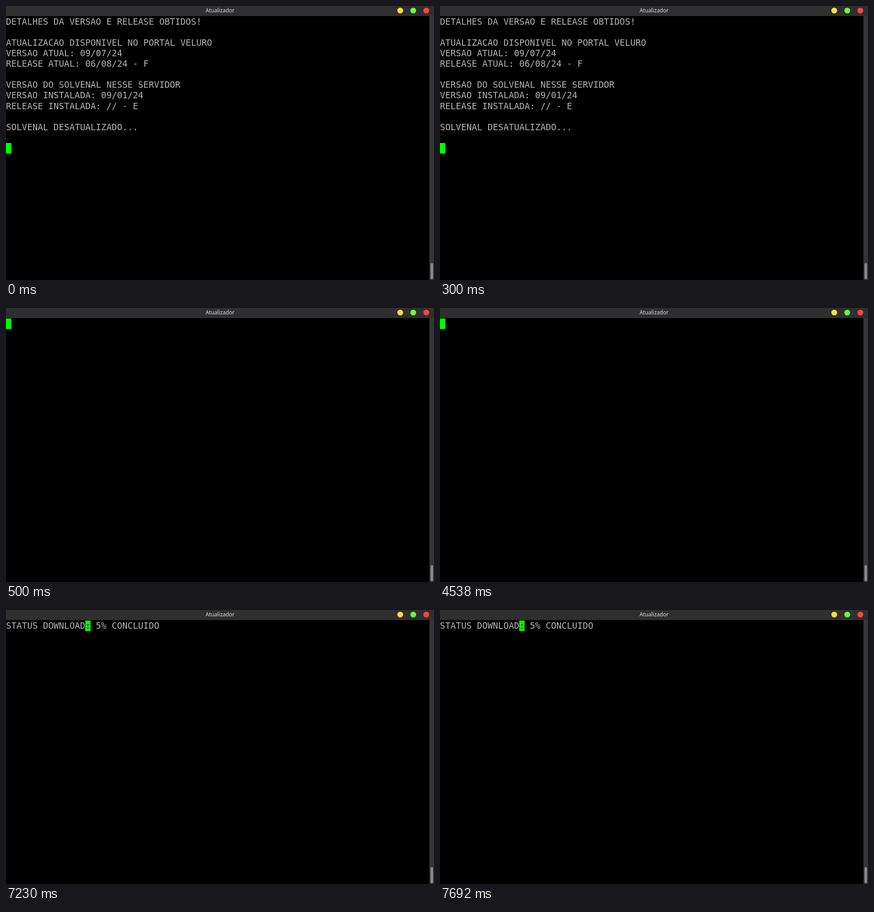
An HTML page with a canvas that plays this animation: 934x600 px, repeating every 8 s.

```html
<!DOCTYPE html>
<html lang="pt-BR">
<head>
<meta charset="utf-8">
<title>Atualizador</title>
<style>
html, body { margin: 0; width: 100%; height: 100%; overflow: hidden; background: #000; }
canvas { display: block; }
</style>
</head>
<body>
<canvas id="stage" width="934" height="600"></canvas>
<script>
const ctx = document.getElementById('stage').getContext('2d');
const LOOP = 8000;
const CELL_W = 11.54, CELL_H = 23.08, TOP = 23;

const screens = [
  {
    from: 0,
    cursor: [0, 12],
    lines: [
      'DETALHES DA VERSAO E RELEASE OBTIDOS!',
      '',
      'ATUALIZACAO DISPONIVEL NO PORTAL VELURO',
      'VERSAO ATUAL: 09/07/24',
      'RELEASE ATUAL: 06/08/24 - F',
      '',
      'VERSAO DO SOLVENAL NESSE SERVIDOR',
      'VERSAO INSTALADA: 09/01/24',
      'RELEASE INSTALADA: // - E',
      '',
      'SOLVENAL DESATUALIZADO...'
    ]
  },
  { from: 500, cursor: [0, 0], lines: [] },
  { from: 7230, cursor: [15, 0], lines: ['STATUS DOWNLOAD: 5% CONCLUIDO'] }
];

function rect(x, y, w, h, color) {
  ctx.fillStyle = color;
  ctx.fillRect(x, y, w, h);
}

function dot(x, color) {
  ctx.fillStyle = color;
  ctx.beginPath();
  ctx.arc(x, 10, 6.3, 0, Math.PI * 2);
  ctx.fill();
}

function drawWindow() {
  rect(0, 0, 934, 600, '#000');
  rect(0, 0, 934, 22, '#2f2f2f');
  ctx.font = '500 11.8px "Noto Sans", "Open Sans", sans-serif';
  ctx.textAlign = 'center';
  ctx.fillStyle = '#dcdcdc';
  ctx.fillText('Atualizador', 467, 14);
  dot(860.3, '#ffdb43');
  dot(888.7, '#63ff43');
  dot(917.2, '#ff4343');

  rect(924, 22, 10, 578, '#363636');
  ctx.fillStyle = '#8b8b8b';
  ctx.beginPath();
  ctx.roundRect(926.5, 563, 5.5, 35, 2.5);
  ctx.fill();
}

function drawText(text, col, row, color) {
  ctx.fillStyle = color;
  ctx.fillText(text, col * CELL_W, TOP + row * CELL_H + 17.9);
}

function drawScreen({ lines, cursor: [col, row] }) {
  ctx.font = '19.17px "DejaVu Sans Mono", monospace';
  ctx.textAlign = 'left';
  lines.forEach((line, i) => drawText(line, 0, i, '#b2b2b2'));
  rect(Math.round(col * CELL_W), Math.round(TOP + row * CELL_H), 11.6, 23, '#00ff00');
  const under = (lines[row] || '')[col];
  if (under) drawText(under, col, row, '#000');
}

function frame(now) {
  const t = now % LOOP;
  drawWindow();
  drawScreen(screens.findLast(s => s.from <= t) || screens[0]);
  requestAnimationFrame(frame);
}

frame(0);
</script>
</body>
</html>
```
